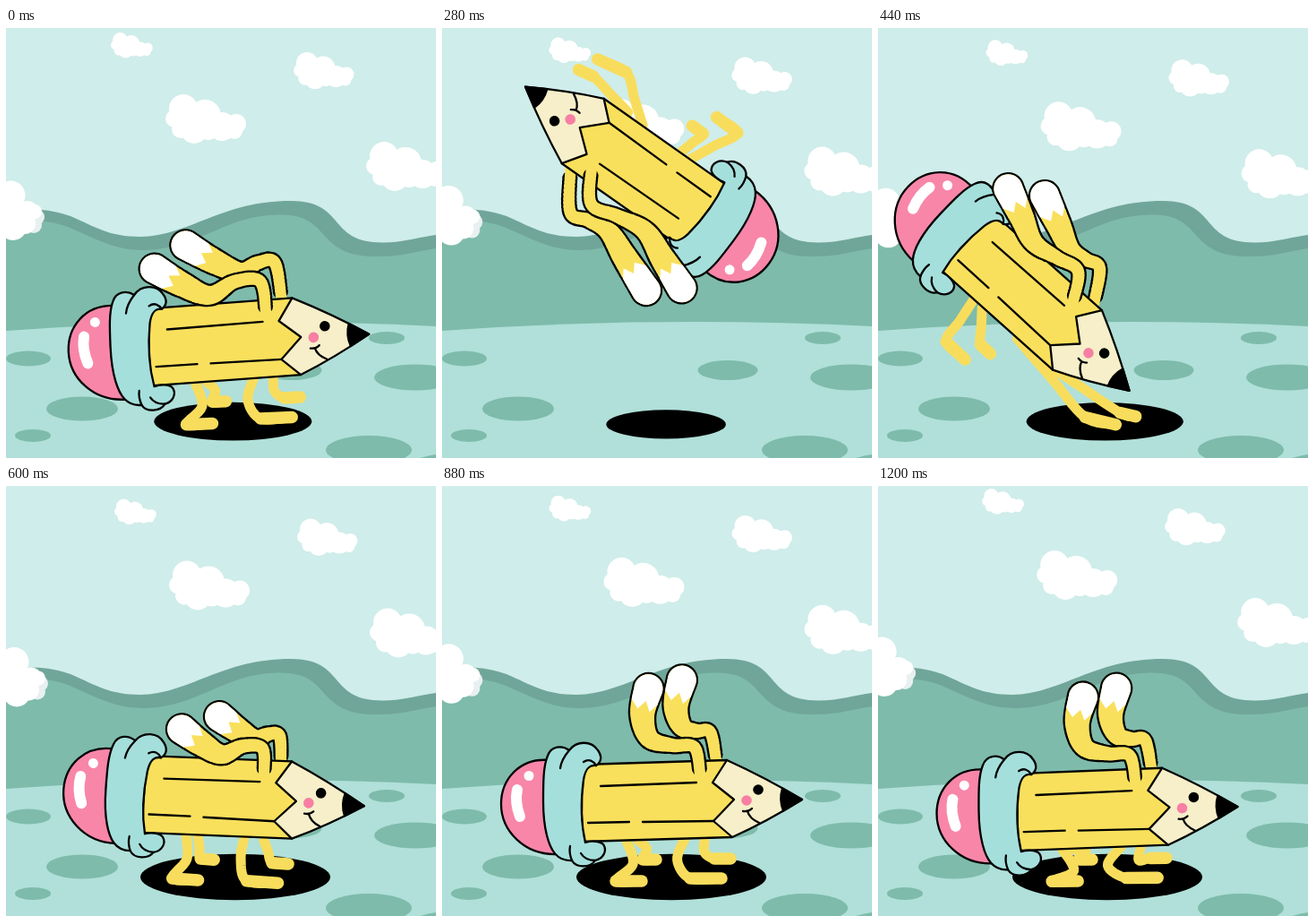
These frames come from a looping animation (480x480 px, 1.24 s). An HTML page:

```html
<!DOCTYPE html>
<html lang="en">
<head>
<meta charset="utf-8">
<title>Pencil backflip</title>
<style>
html, body { margin: 0; width: 100%; height: 100%; overflow: hidden; background: #cfedea; }
svg { display: block; width: 100vw; height: 100vh; }
.ink { stroke: #000; stroke-width: 2.3; stroke-linejoin: round; stroke-linecap: round; }
.line { fill: none; }
.leg { fill: none; stroke: #f8dd5d; stroke-linecap: round; stroke-linejoin: round; }
</style>
</head>
<body>
<svg viewBox="0 0 480 480" preserveAspectRatio="xMidYMid meet">
  <defs>
    <g id="cloud" fill="#fff">
      <circle cx="20" cy="16" r="16"/>
      <circle cx="10" cy="27" r="10"/>
      <circle cx="17" cy="39" r="10"/>
      <circle cx="32" cy="40" r="15"/>
      <circle cx="44" cy="24" r="18"/>
      <circle cx="48" cy="40" r="11"/>
      <circle cx="63" cy="36" r="16"/>
      <circle cx="79" cy="33" r="11"/>
      <circle cx="77" cy="41" r="9"/>
    </g>
  </defs>

  <rect width="480" height="480" fill="#cfedea"/>
  <g class="drift">
    <use href="#cloud" transform="translate(178 74)"/>
    <use href="#cloud" transform="translate(117 5) scale(.52)"/>
    <use href="#cloud" transform="translate(321 27) scale(.75)"/>
    <use href="#cloud" transform="translate(402 127)"/>
  </g>
  <path fill="#70a699" d="M0 207C25 200 50 202 72 210C100 222 115 233 150 233C205 232 240 193 318 193C380 193 358 239.500 420 239.500C445 239.500 462 233 480 231V340H0Z"/>
  <path fill="#7ebbab" d="M0 222C22 214 45 214 66 221C95 232 120 249 155 248C214 247 246 208 305 208.500C364 207 344 255 412 255C440 256 460 249 480 246V350H0Z"/>
  <path fill="#b0e0d9" d="M0 338Q240 321 480 333V480H0Z"/>
  <g fill="#7ebbab">
    <ellipse cx="25" cy="369" rx="25" ry="8.5"/>
    <ellipse cx="85" cy="425" rx="40" ry="13.5"/>
    <ellipse cx="30" cy="455" rx="20" ry="7"/>
    <ellipse cx="425" cy="346" rx="20" ry="7"/>
    <ellipse cx="319" cy="382" rx="33.5" ry="11"/>
    <ellipse cx="457" cy="390" rx="46" ry="14.5"/>
    <ellipse cx="405" cy="471" rx="48" ry="16"/>
    <path d="M462 480Q472 477 480 476V480Z"/>
  </g>
  <g class="drift">
    <g fill="#e8f0f0">
      <circle cx="34" cy="211" r="9"/>
      <circle cx="31" cy="220" r="9"/>
    </g>
    <g fill="#fff">
      <circle cx="5" cy="187" r="16.5"/>
      <circle cx="24" cy="205" r="12"/>
      <circle cx="32" cy="205" r="8"/>
      <circle cx="21" cy="218" r="12"/>
      <circle cx="8" cy="222" r="15"/>
      <circle cx="2" cy="206" r="18"/>
    </g>
  </g>

  <ellipse id="shadow"/>

  <g id="pencil">
    <g id="legs"></g>
    <g id="farEar"></g>
    <path class="ink" fill="#f9e05c" d="M156 311L318 306L326 350L324 392L156 397Z"/>
    <path class="ink line" d="M177 335L284 331M163 376L209 375M224 375L303 374"/>
    <path class="ink" fill="#f6efc9" d="M318 306Q362 326 402 350Q362 375 324 392L303 374L326 350L302 331Z"/>
    <path class="ink" d="M380 337.500L402 350L381 362.500Q376 350 380 337.500Z"/>
    <circle cx="353" cy="339" r="5.800"/>
    <circle cx="340" cy="351" r="5.800" fill="#f77fa3"/>
    <path class="ink line" d="M336 363Q342 364 346 360M341 363Q343 371 354 376"/>
    <path class="ink" fill="#f886a9" d="M120 306C86 303 66 328 66 355C66 385 92 412 128 411Z"/>
    <path fill="none" stroke="#fff" stroke-width="12" stroke-linecap="round" d="M84 339Q81 353 87 369"/>
    <circle cx="97" cy="323.500" r="5.500" fill="#fff"/>
    <path class="ink" fill="#a5dfdb" d="M113 352C113 330 113 313 118 301C122 290 134 289 142 295C150 284 167 284 174 295C179 302 178 308 172 312C164 311 160 316 158 328C155 350 155 376 160 398C166 396 176 396 180 400C185 407 180 416 171 418C166 426 150 427 145 418C128 419 121 406 117 390C114 378 113 366 113 352Z"/>
    <path class="ink line" d="M142 295C137 301 133 307 132 315M158 308C164 304 169 307 172 312M145 418C143 413 142 407 143 402M171 418C164 418 158 415 155 410"/>
    <g id="nearEar"></g>
  </g>
</svg>

<script>
const LOOP = 1240, STEP = 40, PIVOT = [234, 352.5];
const $ = id => document.getElementById(id);
const lerp = (a, b, u) => a + (b - a) * u;

function add(parent, tag, attrs) {
  const el = document.createElementNS("http://www.w3.org/2000/svg", tag);
  set(el, attrs);
  return parent.appendChild(el);
}

function set(el, attrs) {
  for (const k in attrs) el.setAttribute(k, attrs[k]);
}

// Monotone cubic through rows of [time, ...values].
function track(rows) {
  const slope = (i, c) => (rows[i + 1][c] - rows[i][c]) / (rows[i + 1][0] - rows[i][0]);
  function tangent(i, c) {
    if (i === 0) return slope(0, c);
    if (i === rows.length - 1) return slope(i - 1, c);
    const a = slope(i - 1, c), b = slope(i, c);
    return a * b <= 0 ? 0 : 2 * a * b / (a + b);
  }
  return t => {
    let i = 0;
    while (i < rows.length - 2 && t >= rows[i + 1][0]) i++;
    const p = rows[i], q = rows[i + 1], h = q[0] - p[0], u = (t - p[0]) / h, v = 1 - u;
    return p.slice(1).map((a, k) => {
      const c = k + 1;
      return v * v * (1 + 2 * u) * a + u * u * (3 - 2 * u) * q[c]
        + h * u * v * (v * tangent(i, c) - u * tangent(i + 1, c));
    });
  };
}

// time, x, y, angle
const body = track([
  [0, 237.5, 351.5, -2.5],
  [160, 292, 273, -39],
  [290, 222, 163, -153],
  [360, 160, 189, -228],
  [440, 157, 291, -316.5],
  [520, 195, 342, -352],
  [600, 232, 348, -356],
  [880, 234, 352.5, -360],
  [1200, 233.5, 362, -360.5],
  [LOOP, 237.5, 351.5, -362.5]
]);

// time, ear sweep (0 up, 1 back, 2 trailing), ear stretch, front reach, rear kick, air
const pose = track([
  [0, 1, 1.18, 0, 0, .45],
  [160, 1, 1.15, .38, -1, 1],
  [360, 2, 1.4, .45, 0, .95],
  [440, 1.6, 1.15, 1, 1, .46],
  [600, 1, .92, 0, 0, 0],
  [880, 0, 1, 0, 0, 0],
  [1200, 0, 1, 0, 0, 0],
  [LOOP, 1, 1.18, 0, 0, .45]
]);

const drift = track([[0, 0], [600, 9.5], [880, 5.8], [1200, -2], [LOOP, 0]]);

// Joint angles of an ear from base to tip: 0 points up, 90 to the rear.
const SWEEP = [
  [12, 85, 74, 17, -13],
  [8, 88, 116, 66, 58],
  [52, 110, 90, 71, 76]
];
const EAR_R = [16, 13.5, 10.5, 7.6, 6.8, 6.2];
const TIP = 8;
const TEETH = [[1, -4], [.4, 5], [-.1, -5], [-.55, 6], [-1, -3]];

const ears = [
  { id: "farEar", base: [306, 306], bones: [32, 15, 17, 24, 30], give: 1.5 },
  { id: "nearEar", base: [288, 321], bones: [30, 24, 27, 28, 30], give: 1 }
];
for (const e of ears)
  [e.ink, e.skin, e.white] = ["#000", "#f9e05c", "#fff"].map(fill => add($(e.id), "path", { fill }));

const legs = [
  { hip: [219, 396], toe: [239, 417], foot: 15, bone: 13, bend: 1 },
  { hip: [293, 396], toe: [322, 416], foot: 18, bone: 13, bend: -1, front: true },
  { hip: [206, 396], toe: [223, 441], foot: 29, bone: 27, bend: 1 },
  { hip: [271, 394], toe: [312, 438], foot: 35, bone: 25, bend: -1, front: true }
];
for (const l of legs)
  [l.shin, l.sole] = [11, 13.5].map(w => add($("legs"), "path", { class: "leg", "stroke-width": w }));

const line = pts => "M" + pts.map(p => p[0].toFixed(2) + " " + p[1].toFixed(2)).join("L");

// Catmull-Rom samples, any number of components per point.
function smooth(pts, n) {
  const out = [], last = pts.length - 1;
  for (let i = 0; i < last; i++) {
    const a = pts[Math.max(i - 1, 0)], b = pts[i], c = pts[i + 1], d = pts[Math.min(i + 2, last)];
    for (let k = 0; k < n; k++) {
      const u = k / n;
      out.push(b.map((_, j) => {
        const m = (c[j] - a[j]) / 2, w = (d[j] - b[j]) / 2, g = c[j] - b[j];
        return b[j] + u * (m + u * (3 * g - 2 * m - w + u * (m + w - 2 * g)));
      }));
    }
  }
  out.push(pts[last]);
  return out;
}

const dots = (pts, grow) => pts.map(([x, y, r0]) => {
  const r = r0 + grow;
  return `M${(x - r).toFixed(2)} ${y.toFixed(2)}a${r} ${r} 0 1 0 ${2 * r} 0a${r} ${r} 0 1 0 ${-2 * r} 0`;
}).join("");

// White end of an ear with a zigzag border.
function tip(s) {
  const at = (i, side, along) => {
    const [x, y, r] = s[i], dx = s[i + 1][0] - x, dy = s[i + 1][1] - y;
    const l = Math.hypot(dx, dy) || 1, tx = dx / l, ty = dy / l;
    return [x - ty * r * side + tx * along, y + tx * r * side + ty * along];
  };
  const pts = [];
  for (let i = TIP - 1; i > 0; i--) pts.push(at(i, -1, 0));
  for (let k = 0; k <= 16; k++) {
    const a = Math.PI * k / 16;
    pts.push(at(0, -Math.cos(a), -Math.sin(a) * s[0][2]));
  }
  for (let i = 1; i < TIP; i++) pts.push(at(i, 1, 0));
  for (const [side, along] of TEETH) pts.push(at(TIP, side, along));
  return line(pts) + "Z";
}

function drawEar(e, sweep, stretch) {
  const i = Math.min(Math.floor(sweep), 1), k = 1 + (stretch - 1) * e.give;
  const chain = [e.base];
  e.bones.forEach((len, j) => {
    const a = lerp(SWEEP[i][j], SWEEP[i + 1][j], sweep - i) * Math.PI / 180;
    const [x, y] = chain[j];
    chain.push([x - Math.sin(a) * len * k, y - Math.cos(a) * len * k]);
  });
  const s = smooth(chain.reverse().map((p, j) => [...p, EAR_R[j]]), 12);
  set(e.ink, { d: dots(s.slice(0, -3), 2.3) });
  set(e.skin, { d: dots(s, 0) });
  set(e.white, { d: tip(s) });
}

// Two equal bones reach from the hip to the heel; the foot follows.
function drawLeg(l, reach, kick, drop) {
  const r = l.front ? reach : 0;
  const toe = [l.toe[0] + (l.front ? 105 * r : 22 * kick), l.toe[1] - 60 * r + drop];
  const tilt = -r * Math.PI / 6;
  const heel = [toe[0] - l.foot * Math.cos(tilt), toe[1] - l.foot * Math.sin(tilt)];
  const dx = heel[0] - l.hip[0], dy = heel[1] - l.hip[1], d = Math.hypot(dx, dy);
  const out = l.bend * Math.sqrt(Math.max(l.bone ** 2 - d * d / 4, 0)) / d;
  const knee = [l.hip[0] + dx / 2 + dy * out, l.hip[1] + dy / 2 - dx * out];
  set(l.shin, { d: line(smooth([l.hip, knee, heel, toe], 8)) });
  set(l.sole, { d: line([heel, toe]) });
}

const drifters = document.querySelectorAll(".drift");

function draw(t) {
  const [fall] = drift(t), [x, y, angle] = body(t);
  const [sweep, stretch, reach, kick, air] = pose(t);

  drifters.forEach(g => set(g, { transform: `translate(${fall * .42} ${fall})` }));
  set($("shadow"), {
    cx: 256 - 6 * air, cy: 436.5 + 6 * air, rx: 106 - 40 * air, ry: 25.7 - 9.7 * air
  });
  set($("pencil"), {
    transform: `translate(${x} ${y}) rotate(${angle}) translate(${-PIVOT[0]} ${-PIVOT[1]})`
  });

  const drop = Math.max(-10, Math.min(10, PIVOT[1] - y));
  for (const e of ears) drawEar(e, sweep, stretch);
  for (const l of legs) drawLeg(l, reach, kick, drop);
}

const start = performance.now();
function tick() {
  const t = Math.max(performance.now() - start, 0) % LOOP;
  draw(Math.floor(t / STEP) * STEP);
  requestAnimationFrame(tick);
}
tick();
</script>
</body>
</html>
```
